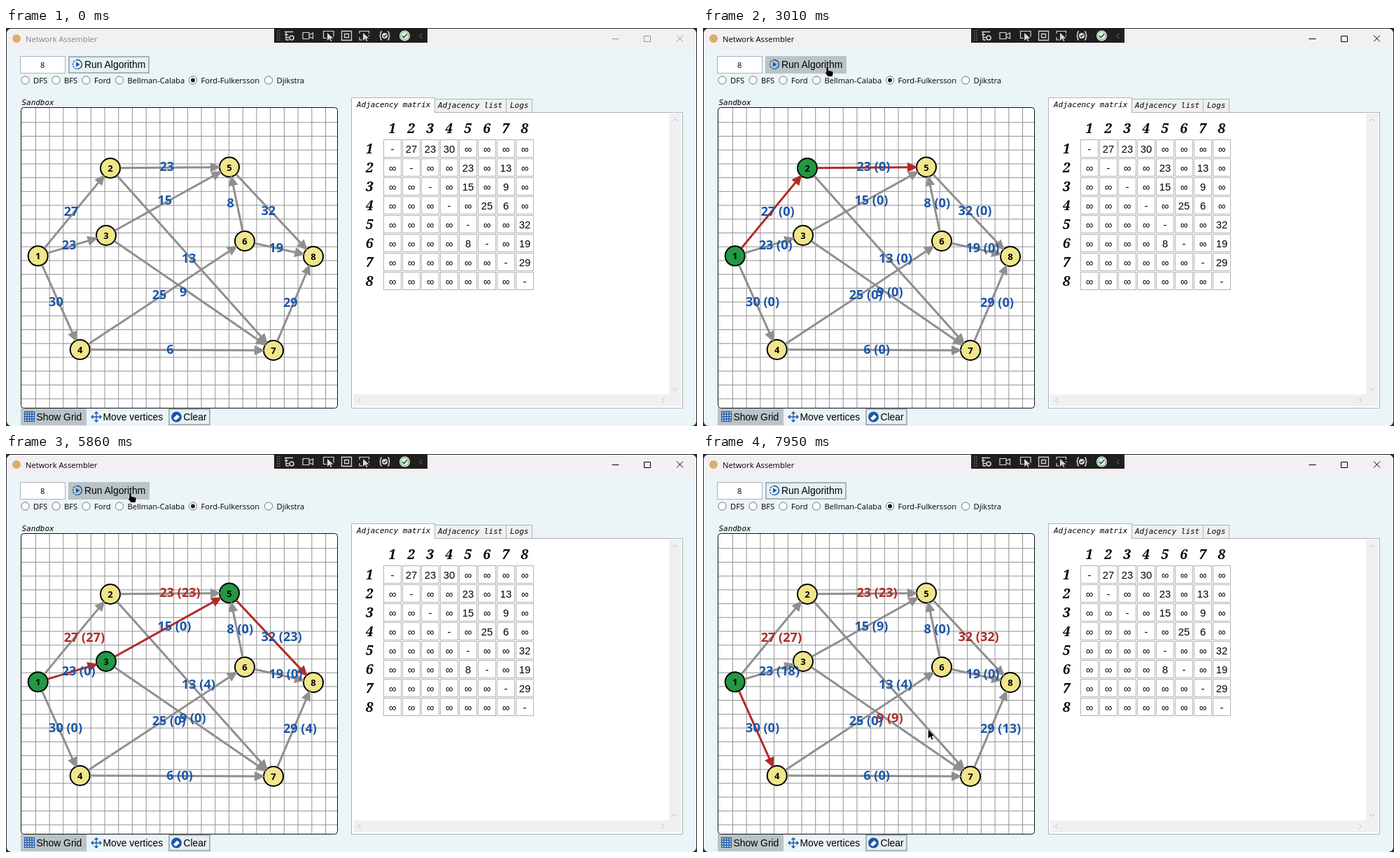
Write an HTML page that moves like this. It is 987 px wide and 568 px high and loops after 8000 ms.

```html
<!DOCTYPE html>
<html lang="en">
<head>
<meta charset="utf-8">
<title>Network Assembler</title>
<style>
html, body { margin: 0; width: 100%; height: 100%; overflow: hidden; background: #2b2b2b; }
svg { display: block; }
.ui { font: 11.2px "Open Sans", sans-serif; }
.btn { font: 13.9px "Liberation Sans", Arial, sans-serif; }
.cell { font: 14.8px "Liberation Sans", Arial, sans-serif; text-anchor: middle; }
.mono { font: italic 10.95px "DejaVu Sans Mono", monospace; }
.head { font: italic 600 19px "Noto Serif", serif; text-anchor: middle; }
.cap { font: bold 18.1px "Open Sans", sans-serif; }
.num { font: bold 13px "Open Sans", sans-serif; text-anchor: middle; }
</style>
</head>
<body>
<svg id="stage" width="987" height="568" viewBox="0 0 987 568"></svg>
<script>
const LOOP = 8000;
const GREY = '#8f8f8f', RED = '#b22a26', BLUE = '#1b56a6';
const YELLOW = '#f0e68c', GREEN = '#219843', HOVER = '#b9c4c8', FACE = '#e6f0f3';
const stage = document.getElementById('stage');

function add(tag, attrs, parent = stage) {
  const node = document.createElementNS('http://www.w3.org/2000/svg', tag);
  for (const k in attrs) node.setAttribute(k, attrs[k]);
  parent.appendChild(node);
  return node;
}
const set = (node, k, v) => { if (node.getAttribute(k) !== v) node.setAttribute(k, v); };
const show = (node, on) => set(node, 'visibility', on ? 'visible' : 'hidden');
const rect = (x, y, width, height, fill, more) => add('rect', { x, y, width, height, fill, ...more });
const path = (d, stroke, width = 1, more) =>
  add('path', { d, stroke, 'stroke-width': width, fill: 'none', ...more });
const dot = (cx, cy, r, fill, more) => add('circle', { cx, cy, r, fill, ...more });
function text(str, x, y, cls, fill = '#000') {
  const node = add('text', { x, y, class: cls, fill });
  node.textContent = str;
  return node;
}

// Window
rect(0, 0, 987, 568, '#2b2b2b');
rect(1, 1, 985, 567, '#ebf4f7', { rx: 7 });
path('M1 30V8a7 7 0 0 1 7-7H979a7 7 0 0 1 7 7V30Z', 'none', 0, { fill: '#f3f0f3' });
dot(15, 15, 6, '#dcae6c');
const title = text('Network Assembler', 28, 19.5, 'ui');
const controls = path('M865.5 15.5h10M911.5 11.5h9v8h-9zM958 10.5l9 9m0-9l-9 9', '#000');

// Debug toolbar
rect(383, 0, 219, 21, '#1f1f1f');
for (let i = 0; i < 10; i++) rect(387 + (i % 2) * 3, 3 + (i >> 1) * 3.4, 1.4, 1.4, '#777');
const ICON = '#d8d8d8';
path('M398 5.5h12M398 9.5h5M400 13.5h4M400 17h4M400 5v12', ICON, 1.3);
dot(408, 14, 3, 'none', { stroke: ICON, 'stroke-width': 1.6 });
path('M424 6.5h9v9h-9zM433.5 9.5l5-2.5v8l-5-2.5', ICON, 1.2);
path('M458 14.5h-4.5v-10h14.5v8', ICON, 1.2);
path('M479.5 4.5h14v13h-14zM483.5 8.5h6v5h-6z', ICON, 1.3);
path('M505 8v-3.5h4M514 4.5h4.5v3.5M505 13v4h4M518.5 12v-2M509 4.5h5', ICON, 1.2);
for (const x of [459, 510]) path(`M${x} 7v11l3-3 2 4 1.5-.8-2-3.5h4z`, 'none', 0, { fill: ICON });
path('M537 5q-2 0-2 3t-1.5 3q1.5 0 1.5 3t2 3M545 5q2 0 2 3t1.5 3q-1.5 0-1.5 3t-2 3', ICON, 1.5);
dot(541, 11, 4, ICON);
path('M539 11l1.5 1.5 3-3', '#1f1f1f', 1.2);
dot(569.5, 11, 7.5, '#f2f2f2');
dot(569.5, 11, 5.8, '#e4efe4', { stroke: '#5d9a66', 'stroke-width': 1 });
path('M566 11l2.5 2.5 4.5-5', '#1d5c2a', 1.7);
path('M594.5 8l-3.5 3.5 3.5 3.5', '#777');

// Top controls
rect(20.5, 40.5, 64, 24, '#fff', { stroke: '#abb3b8' });
text('8', 49, 56.5, 'ui');
const run = rect(90, 41, 114, 23, FACE, { stroke: '#a5b4b9', 'stroke-width': 2 });
path('M102 45.5a6.5 6.5 0 0 1 0 13', BLUE, 1.5);
path('M102 45.5a6.5 6.5 0 0 0 0 13', BLUE, 1.5, { 'stroke-dasharray': '2.5 1.6' });
path('M100 48.5l5.5 3.5-5.5 3.5z', 'none', 0, { fill: BLUE });
text('Run Algorithm', 112, 57, 'btn');
const radios = [['DFS', 27.5], ['BFS', 71.5], ['Ford', 114.5], ['Bellman-Calaba', 162],
  ['Ford-Fulkersson', 267], ['Djikstra', 375]].map(([name, x]) => {
  text(name, x + 11.5, 79, 'ui');
  return dot(x, 74.5, 5.6, '#fff', { stroke: '#707070' });
});
dot(267, 74.5, 3, '#212121');

// Sandbox with grid
text('Sandbox', 22.5, 109.5, 'mono');
rect(21.5, 113.5, 452, 429, '#fff', { rx: 4 });
let grid = '';
for (let i = 1; i < 23; i++) {
  const x = 22.7 + i * 19.72, y = 115 + i * 19.72;
  grid += `M${x} 114V542`;
  if (y < 541) grid += `M22 ${y}H473`;
}
path(grid, '#929292');
rect(21.5, 113.5, 452, 429, 'none', { rx: 4, stroke: '#111' });

// Bottom buttons
rect(21, 543, 94, 24, HOVER);
rect(26, 547, 15, 15, BLUE, { rx: 1 });
for (let i = 0; i < 16; i++) rect(27.2 + (i % 4) * 3.5, 548.2 + (i >> 2) * 3.5, 2.2, 2.2, '#cbd7e2');
text('Show Grid', 43.5, 559.5, 'btn');
path('M129 549v12M123 555h12M126.5 550.5l2.5-2.5 2.5 2.5M126.5 559.5l2.5 2.5 2.5-2.5' +
  'M124.5 552.5l-2.5 2.5 2.5 2.5M133.5 552.5l2.5 2.5-2.5 2.5', BLUE, 1.3);
text('Move vertices', 138.5, 559.5, 'btn');
rect(233, 544, 58, 22, FACE, { stroke: '#a5b4b9', 'stroke-width': 2 });
dot(243.5, 555, 7.5, BLUE);
path('M239 557l5.5-5.5 3.5 3.5-4.5 4.5h-2z', 'none', 0, { fill: '#fff' });
text('Clear', 253.5, 559.5, 'btn');

// Tabs and panel
rect(493.5, 120.5, 473, 422, '#fff', { stroke: '#acb4b8' });
rect(612.5, 101.5, 102, 19, '#f0f0f0', { stroke: '#acb4b8' });
rect(714.5, 101.5, 37, 19, '#f0f0f0', { stroke: '#acb4b8' });
path('M493.5 121V99.5H612.5V121', '#acb4b8', 1, { fill: '#fff' });
text('Adjacency matrix', 501, 113, 'mono');
text('Adjacency list', 617, 114, 'mono');
text('Logs', 720, 114, 'mono');
rect(947, 122, 17, 402, '#f0f0f0');
rect(496, 523, 468, 17, '#f0f0f0');
path('M952 133l3.5-3.5 3.5 3.5M952 514l3.5 3.5 3.5-3.5' +
  'M506.5 528l-3.5 3.5 3.5 3.5M937 528l3.5 3.5-3.5 3.5', '#bfbfbf');

const nodes = [[45.7, 325.3], [149, 200], [143, 296], [105.7, 459],
  [319, 198.5], [341, 304], [382, 460], [439, 326]];
const caps = { 12: 27, 13: 23, 14: 30, 25: 23, 27: 13, 35: 15, 37: 9, 46: 25, 47: 6, 58: 32, 65: 8, 68: 19, 78: 29 };

// Adjacency matrix
for (let r = 1; r <= 8; r++) {
  const mid = 27 * (r - 1);
  text(r, 551.5 + mid, 150, 'head');
  text(r, 519, 178.5 + mid, 'head');
  for (let c = 1; c <= 8; c++) {
    const x = 539.5 + 27 * (c - 1);
    rect(x, 159.5 + mid, 25, 25, '#fff', { stroke: '#b0b5ba' });
    text(r === c ? '-' : caps[`${r}${c}`] || '∞', x + 12.5, 177.5 + mid, 'cell');
  }
}

// Graph
const discs = nodes.map(([x, y], i) => {
  const disc = dot(x, y, 14, YELLOW, { stroke: '#000', 'stroke-width': 2 });
  text(i + 1, x, y + 5, 'num');
  return disc;
});
const ends = id => [nodes[id[0] - 1], nodes[id[1] - 1]];
const edges = Object.keys(caps).map(id => {
  const [[x1, y1], [x2, y2]] = ends(id);
  const len = Math.hypot(x2 - x1, y2 - y1), tip = len - 12;
  const g = add('g', { transform: `translate(${x1} ${y1}) rotate(${Math.atan2(y2 - y1, x2 - x1) * 180 / Math.PI})` });
  add('path', { d: `M14.5 0H${tip - 4}`, stroke: 'currentColor', 'stroke-width': 3 }, g);
  add('path', { d: `M${tip} 0l-15-7v14z`, fill: 'currentColor' }, g);
  return { id, g };
});
for (const e of edges) {
  const [[x1, y1], [x2, y2]] = ends(e.id);
  e.label = text('', (x1 + x2) / 2 - 14.6, (y1 + y2) / 2 + 5, 'cap', BLUE);
}

// Each hop: edge, time it turns red, time its end turns green
const START = 1800, ROOT = 2400;
const runs = [
  { hops: [['12', 2600, 2800], ['25', 2940, 3160], ['58', 3290]], flow: 23, done: 3500, reset: 3640 },
  { hops: [['12', 3700, 3890], ['27', 4020, 4350], ['78', 4480]], flow: 4, done: 4740, reset: 4880 },
  { hops: [['13', 5080, 5290], ['35', 5430, 5730], ['58', 5800]], flow: 9, done: 6060, reset: 6270 },
  { hops: [['13', 6400, 6600], ['37', 6800, 7080], ['78', 7210]], flow: 9, done: 7430, reset: 7560 },
  { hops: [['14', 7700]], flow: 0, done: LOOP, reset: LOOP }
];

// Pointer
const arrow = path('M0 0V13.5l3.2-3 2.1 4.6 2.2-1-2-4.4H9.5Z', '#fff', 0.6, { fill: '#000' });
const hand = path('M0 1q1.5-1.8 3 0V5.5l5.5 1.2q1.8.6 1.5 2.5l-1.2 5H2.5L-1.5 9.5q0-2 1.5-1Z',
  '#fff', 0.5, { fill: '#000' });
const track = [[70, 985, 556], [800, 172, 76], [1000, 177, 70], [1130, 177, 63], [1300, 176, 55],
  [6560, 176, 55], [6730, 220, 127], [7040, 340, 330], [7350, 441, 420], [7800, 321.5, 393]];

function pointerAt(t) {
  let i = 0;
  while (i < track.length - 2 && t >= track[i + 1][0]) i++;
  const [t0, x0, y0] = track[i], [t1, x1, y1] = track[i + 1];
  const k = Math.min(1, Math.max(0, (t - t0) / (t1 - t0)));
  const s = k * k * (3 - 2 * k);
  return [x0 + (x1 - x0) * s, y0 + (y1 - y0) * s];
}

function draw(t) {
  const active = t >= 1480;
  set(title, 'fill', active ? '#000' : '#858585');
  set(controls, 'stroke', active ? '#000' : '#979797');

  const over = t >= 1180 && t < 6640;
  set(run, 'fill', over ? HOVER : FACE);
  set(run, 'stroke', over ? HOVER : '#a5b4b9');
  const tint = t >= 860 && t < 1200 || t >= 6620 && t < 6800;
  set(radios[3], 'stroke', tint ? '#5b9fd8' : '#707070');

  const red = new Set(), green = new Set(t >= ROOT ? [1] : []), flow = {};
  for (const r of runs) for (const [id, lit, reached] of r.hops) {
    if (t >= r.done) flow[id] = (flow[id] || 0) + r.flow;
    if (t >= r.reset) continue;
    if (t >= lit) red.add(id);
    if (t >= reached) green.add(+id[1]);
  }
  discs.forEach((d, i) => set(d, 'fill', green.has(i + 1) ? GREEN : YELLOW));
  for (const { id, g, label } of edges) {
    const used = flow[id] || 0;
    const str = t < START ? `${caps[id]}` : `${caps[id]} (${used})`;
    if (label.textContent !== str) label.textContent = str;
    set(label, 'fill', used === caps[id] ? RED : BLUE);
    set(g, 'color', red.has(id) ? RED : GREY);
  }

  const [x, y] = pointerAt(t), pressing = t >= 1060 && t < 6640;
  for (const c of [arrow, hand]) set(c, 'transform', `translate(${x} ${y})`);
  show(hand, pressing);
  show(arrow, t >= 70 && !pressing);
}

const began = performance.now();
function tick() {
  draw((performance.now() - began) % LOOP);
  requestAnimationFrame(tick);
}
draw(0);
requestAnimationFrame(tick);
</script>
</body>
</html>
```
